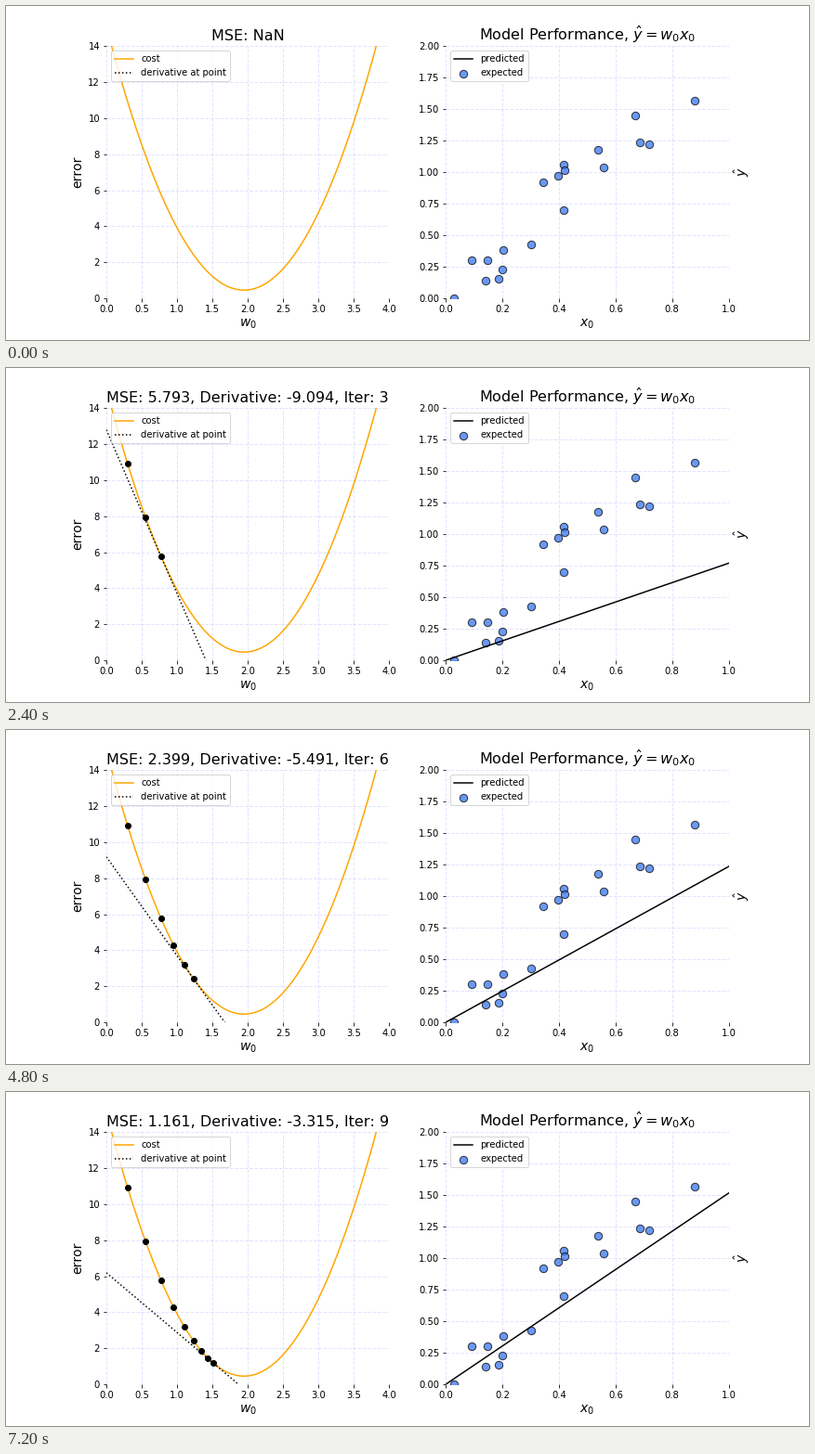
Write a matplotlib script that moves like this. It is 864 px wide and 360 px high and loops after 8000 ms.

```python
import numpy as np
import matplotlib.pyplot as plt
from matplotlib.animation import FuncAnimation

STEPS = 10
INTERVAL = 800
START_W, RATE = 0.3, 0.02

# Noisy samples of y = 2x
np.random.seed(1)
xs = np.random.rand(20)
ys = 2 * xs + 0.2 * np.random.randn(20)


def cost(w):
    """Squared error summed over the samples, for one or many weights."""
    return np.sum((np.multiply.outer(w, xs) - ys) ** 2, axis=-1)


def gradient(w):
    return 2 * np.sum(xs * (w * xs - ys))


def descend(count):
    """Weights visited in the first `count` iterations."""
    ws = [START_W]
    while len(ws) < count:
        ws.append(ws[-1] - RATE * gradient(ws[-1]))
    return np.array(ws)


def style(ax, xmax, ymax):
    ax.set_xlim(0, xmax)
    ax.set_ylim(0, ymax)
    ax.grid(color="blue", alpha=0.11, linestyle="--", linewidth=1)
    ax.set_axisbelow(True)
    for spine in ax.spines.values():
        spine.set_visible(False)
    ax.legend(loc="upper left", fontsize=10)


plt.rcParams["font.family"] = "DejaVu Sans"
plt.rcParams["text.kerning_factor"] = 6
fig, (left, right) = plt.subplots(1, 2, figsize=(12, 5), dpi=72)
fig.subplots_adjust(left=0.125, right=0.9, bottom=0.125, top=0.88, wspace=0.2)

w_axis = np.linspace(0, 4, 100)
left.plot(w_axis, cost(w_axis), color="orange", label="cost")
tangent, = left.plot([], [], "k:", label="derivative at point")
trail, = left.plot([], [], "ko", markersize=6)
title = left.set_title("MSE: NaN", fontsize=16)
left.set_xlabel("$w_0$", fontsize=14)
left.set_ylabel("error", fontsize=14)
style(left, 4, 14)

fit, = right.plot([], [], "k", label="predicted")
right.scatter(xs, ys, s=70, color="#3876ee", edgecolor="black",
              linewidth=1, alpha=0.75, label="expected")
right.set_title(r"Model Performance, $\hat{y} = w_0x_0$", fontsize=16)
right.set_xlabel("$x_0$", fontsize=14)
right.set_ylabel(r"$\hat{y}$", fontsize=14)
right.yaxis.set_label_position("right")
style(right, 1, 2)


def draw(step):
    if step == 0:
        for line in (tangent, trail, fit):
            line.set_data([], [])
        title.set_text("MSE: NaN")
    else:
        ws = descend(step)
        w = ws[-1]
        error, slope = cost(w), gradient(w)
        ends = np.array([0, 4])
        tangent.set_data(ends, error + slope * (ends - w))
        trail.set_data(ws, cost(ws))
        fit.set_data([0, 1], [0, w])
        title.set_text(f"MSE: {error:.3f}, Derivative: {slope:.3f}, Iter: {step}")
    return tangent, trail, fit, title


anim = FuncAnimation(fig, draw, frames=STEPS, interval=INTERVAL,
                     init_func=lambda: draw(0), repeat=True, repeat_delay=0)
plt.show()
```
